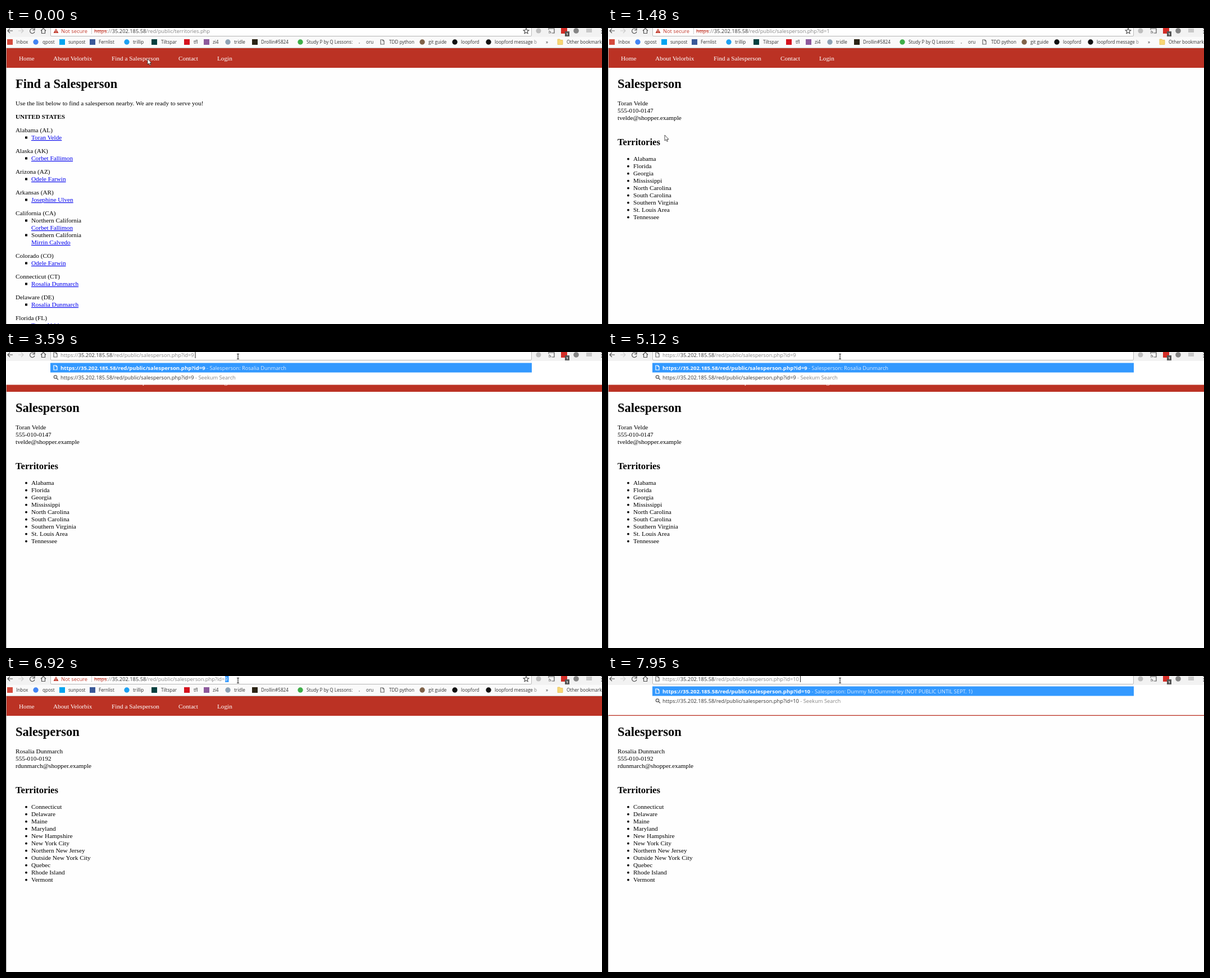
Animation, 1061 px wide and 528 px high, one loop 8 s. Source, as an HTML page:

```html
<!DOCTYPE html>
<html lang="en">
<head>
<meta charset="utf-8">
<title>Find a Salesperson</title>
<style>
  html, body { margin: 0; width: 100%; height: 100%; overflow: hidden; background: #fefefe; }
  svg { display: block; width: 100vw; height: 100vh; }
  text { white-space: pre; font: 11.25px "Liberation Serif", serif; fill: #000; }
  .h1 { font-size: 22.5px; font-weight: bold; }
  .h2 { font-size: 16.6px; font-weight: bold; }
  .bold { font-weight: bold; }
  .link { fill: #00e; text-decoration: underline; }
  .nav { fill: #fff; }
  .ui { font: 9.3px "Open Sans", "Noto Sans", sans-serif; fill: #333; }
  .mark { font: 8.1px "Open Sans", "Noto Sans", sans-serif; fill: #333; }
  .badge { font: bold 6px "Open Sans", sans-serif; fill: #fff; }
  .match { font-size: 9.55px; font-weight: bold; }
  .picked { fill: #fff; }
  .pale { fill: #dcecff; }
  .dim { fill: #858585; }
  .alert { fill: #c0392b; }
  .struck { text-decoration: line-through; }
  .line { fill: none; stroke: #555; stroke-width: 1.2; }
</style>
</head>
<body>
<svg id="stage" viewBox="0 0 1061 528" preserveAspectRatio="none"></svg>
<script>
const LOOP = 8000;
const HOST = "35.202.185.58";
const PATH = "/red/public/";

const text = (x, y, s, cls = "") => `<text x="${x}" y="${y}" class="${cls}">${s}</text>`;
const span = (s, cls) => `<tspan class="${cls}">${s}</tspan>`;
const rect = (x, y, w, h, fill) => `<rect x="${x}" y="${y}" width="${w}" height="${h}" fill="${fill}"/>`;
const circle = (x, y, r, fill) => `<circle cx="${x}" cy="${y}" r="${r}" fill="${fill}"/>`;
const line = (d, stroke = "#555") => `<path class="line" d="${d}" style="stroke:${stroke}"/>`;
const shape = (d, x, y, fill, stroke) =>
  `<path transform="translate(${x} ${y})" d="${d}" fill="${fill}" stroke="${stroke}" stroke-width=".8"/>`;

// Web pages
const torin = "Toran Velde", walden = "Corbet Fallimon", odele = "Odele Farwin",
      josephine = "Josephine Ulven", mirrin = "Mirrin Calvedo", rosalia = "Rosalia Dunmarch";

const regions = [
  ["Alabama (AL)", [torin]],
  ["Alaska (AK)", [walden]],
  ["Arizona (AZ)", [odele]],
  ["Arkansas (AR)", [josephine]],
  ["California (CA)", [walden, "Northern California"], [mirrin, "Southern California"]],
  ["Colorado (CO)", [odele]],
  ["Connecticut (CT)", [rosalia]],
  ["Delaware (DE)", [rosalia]],
  ["Florida (FL)", [torin]],
];

function territoriesPage() {
  let out = text(17, 107, "Find a Salesperson", "h1") +
    text(17, 138, "Use the list below to find a salesperson nearby. We are ready to serve you!") +
    text(17, 162, "UNITED STATES", "bold");
  let y = 186;
  for (const [region, ...entries] of regions) {
    out += text(17, y, region);
    for (const [person, area] of entries) {
      y += 13;
      out += rect(34, y - 5.5, 4, 4, "#000");
      if (area) {
        out += text(45, y, area);
        y += 13;
      }
      out += text(45, y, person, "link");
    }
    y += 24;
  }
  return out;
}

function salespersonPage(details, territories) {
  return text(17, 107, "Salesperson", "h1") +
    details.map((s, i) => text(17, 138 + i * 13, s)).join("") +
    text(17, 209, "Territories", "h2") +
    territories.map((s, i) => circle(36, 233.7 + i * 13, 1.9, "#000") + text(45, 236.7 + i * 13, s)).join("");
}

const pages = {
  list: territoriesPage(),
  first: salespersonPage([torin, "555-010-0147", "tvelde@shopper.example"],
    ["Alabama", "Florida", "Georgia", "Mississippi", "North Carolina", "South Carolina",
     "Southern Virginia", "St. Louis Area", "Tennessee"]),
  ninth: salespersonPage([rosalia, "555-010-0192", "rdunmarch@shopper.example"],
    ["Connecticut", "Delaware", "Maine", "Maryland", "New Hampshire", "New York City",
     "Northern New Jersey", "Outside New York City", "Quebec", "Rhode Island", "Vermont"]),
};

const navBar = rect(0, 36, 1, 492, "#aaa") + rect(1, 36, 1060, 35, "#bb3224") +
  [[23, "Home"], [84, "About Velorbix"], [188, "Find a Salesperson"], [307, "Contact"], [376, "Login"]]
    .map(([x, s]) => text(x, 58, s, "nav")).join("");

// Browser frame
const fileIcon = (x, y, color) => line(`M${x - 3} ${y - 4}h4l2 2v6h-6zM${x + 1} ${y - 4}v2h2`, color);
const searchIcon = y => line(`M90 ${y + 1}l3 3`) +
  `<circle class="line" cx="88" cy="${y - 1}" r="2.7"/>`;

const toolbar = rect(0, 0, 1061, 16, "#f2f2f2") +
  line("M12 5H3M7 1L3 5l4 4") + line("M22 5h9M27 1l4 4-4 4", "#ccc") +
  line("M50.5 3A4.3 4.3 0 1 0 51 6.5M51 0v4h-4") + line("M62 5l4.5-4.5L71 5M63.5 4v5.5h6V4") +
  `<rect x="79.5" y="-3" width="856" height="17.5" rx="1.5" fill="#fff" stroke="#bbb"/>` +
  circle(948, 5, 4.5, "#bdbdbd") +
  line("M966 3V1h10v8h-4M966 5.5a4 4 0 0 1 4 4M966 8a1.5 1.5 0 0 1 1.5 1.5") +
  rect(988, 0, 11, 10, "#d32d27") + rect(995, 6, 8, 9, "#555") + text(997.3, 13, "1", "badge") +
  circle(1015, 5, 4.8, "#858585") + rect(1033, 1, 10, 7, "#c8c8c8") +
  [1, 5, 9].map(y => circle(1060.5, y, 1.1, "#555")).join("");

// Bookmark: icon centre, label start, label, icon colour, square icon
const bookmarks = [
  [7, 18, "Inbox", "#d54b3d", true],
  [53, 65, "qpost", "#4285f4"],
  [100, 111, "sunpost", "#00a4ef", true],
  [154, 165, "Fernlist", "#3b5998", true],
  [215, 226, "trillip", "#1da1f2"],
  [264, 276, "Tiltspar", "#05403f", true],
  [322, 334, "tfl", "#d5121e", true],
  [357, 368, "zi4", "#8d5a9c", true],
  [395, 406, "tridle", "#8fa3b5"],
  [443, 454, "Drollin#5824", "#2b2415", true],
  [524, 535, "Study P by Q Lessons:", "#3fae49"],
  [741, 752, "git guide", "#80634a"],
  [799, 810, "loopford", "#111"],
  [859, 870, "loopford message " + span("b", "dim"), "#111"],
];

const bookmarkItems = bookmarks.map(([x, labelX, label, color, square]) =>
    (square ? rect(x - 5, 20, 10, 10, color) : circle(x, 25, 4.7, color)) + text(labelX, 28, label, "mark")).join("") +
  circle(629, 27, .9, "#999") + text(641, 28, "oru", "mark") +
  fileIcon(670, 25, "#666") + text(682, 28, "TDD python", "mark") +
  text(961, 28, "»", "mark") +
  shape("M0 0h4l1 1.5h4v8H0z", 982, 20, "#f8d775", "#e5bd52") + text(998, 28, "Other bookmarks", "mark");

const bookmarkBar = hover => rect(0, 16, 1061, 19, "#fafafa") + rect(0, 35, 1061, 1, "#ccc") +
  (hover ? rect(384, 16, 28, 18, "#e9edf2") : "") + bookmarkItems;

function addressBar({ file, mode, selected, caret }) {
  if (mode === "typed") {
    const url = span("https://", "dim") + HOST + span(PATH + file, "dim");
    return fileIcon(88, 5, "#666") + text(97, 8.5, url, "ui") +
      (caret ? rect(caret, 0, 1, 11, "#222") : "");
  }
  const all = selected === "all", digit = selected === "digit";
  const tone = cls => all ? "picked" : cls;
  const tail = digit ? span(file.slice(0, -1), "dim") + span(file.slice(-1), "picked") : span(file, tone("dim"));
  const url = span("https", tone("alert") + " struck") + span("://", tone("dim")) +
    span(HOST, tone("")) + span(PATH, tone("dim")) + tail;
  return shape("M4.5 0L9 8H0z", 84.5, 1, "#c0392b", "none") + rect(88.5, 3.5, 1, 3, "#fff") + rect(88.5, 7.2, 1, 1, "#fff") +
    text(98, 8.5, "Not secure", "ui alert") + rect(152, 0, 1, 11, "#ccc") +
    (all ? rect(157, 0, 239, 11, "#3399ff") : "") + (digit ? rect(390, 0, 6.5, 11, "#3399ff") : "") +
    text(157, 8.5, url, "ui") +
    line("M926 .5l1.4 3.2 3.4.3-2.6 2.3.8 3.4-3-1.8-3 1.8.8-3.4-2.6-2.3 3.4-.3z");
}

function dropdown({ file, menu }) {
  const { top, bottom, title, extra } = menu;
  const url = "https://" + HOST + PATH;
  let out = rect(0, 15.5, 1061, bottom - 15.5, "#fff") + rect(79, top, 857, 17, "#3399ff") +
    fileIcon(88, top + 8.5, "#fff") +
    text(97, top + 12, span(url + file, "match picked") + span(" - Salesperson: " + title, "pale"), "ui") +
    searchIcon(top + 26) + text(97, top + 29.5, url + file + span(" - Seekum Search", "dim"), "ui");
  if (extra) {
    out += fileIcon(88, top + 42.5, "#666") +
      text(97, top + 46.5, url + extra.file + span(" - Salesperson: " + extra.title, "dim"), "ui");
  }
  return out;
}

// Pointers, drawn from their hot spot
const pointers = {
  arrow: (x, y) => shape("M0 0V10L2.3 8 4 11.5 5.5 10.8 4 7.5H7Z", x, y, "#fff", "#222"),
  hand: (x, y) => shape("M-1.2 .5h2.2v4.5l5 1.2v4l-1.5 3.6h-5.5l-3-4.8 1-1.2 1.8 1.3z", x, y, "#fff", "#222"),
  beam: (x, y) => line(`M${x - 2} ${y - 4.5}h4M${x} ${y - 4.5}v9M${x - 2} ${y + 4.5}h4`, "#333"),
};

// Each step changes part of the state and holds until the next
const person = id => "salesperson.php?id=" + id;
const hidden = "Dummy McDummerley (NOT PUBLIC UNTIL SEPT. 1)";
const steps = [
  [0, { page: "list", file: "territories.php", mode: "idle", pointer: ["arrow", 252, 55] }],
  [410, { pointer: ["arrow", 208, 112] }],
  [560, { pointer: ["arrow", 158, 169] }],
  [710, { pointer: ["arrow", 128, 182] }],
  [835, { pointer: ["arrow", 106, 190] }],
  [960, { pointer: ["hand", 97, 190] }],
  [1210, { pointer: ["hand", 97.5, 190] }],
  [1350, { page: "first", file: person(1) }],
  [1480, { pointer: ["arrow", 101, 191] }],
  [1630, { pointer: ["arrow", 220, 118] }],
  [1750, { pointer: ["hand", 325, 49] }],
  [1900, { pointer: ["arrow", 374, 31] }],
  [2050, { pointer: ["arrow", 402, 18], hover: true }],
  [2170, { pointer: ["beam", 413, 8] }],
  [2410, { selected: "all" }],
  [2540, { selected: "digit" }],
  [3590, { mode: "typed", file: person(9), selected: null, hover: false, caret: 336.5,
           menu: { top: 19.5, bottom: 58.5, title: rosalia } }],
  [4090, { caret: 0 }],
  [4590, { caret: 336.5 }],
  [5120, { caret: 0 }],
  [5640, { menu: null }],
  [5760, { mode: "idle", page: "ninth" }],
  [6790, { selected: "all" }],
  [6920, { selected: "digit" }],
  [7800, { mode: "typed", file: person(1), selected: null, caret: 336.5,
           menu: { top: 18.5, bottom: 94, title: torin, extra: { file: person(10), title: hidden } } }],
  [7950, { file: person(10), caret: 342, menu: { top: 18.5, bottom: 69.7, title: hidden } }],
];

function render(state) {
  const [kind, x, y] = state.pointer;
  return rect(0, 0, 1061, 528, "#fefefe") + navBar + pages[state.page] + bookmarkBar(state.hover) +
    (state.menu ? dropdown(state) : "") + toolbar + addressBar(state) + pointers[kind](x, y);
}

const stage = document.getElementById("stage");
let shown = 0;

function tick() {
  const time = performance.now() % LOOP;
  const passed = steps.filter(([start]) => start <= time);
  if (passed.length !== shown) {
    shown = passed.length;
    stage.innerHTML = render(Object.assign({}, ...passed.map(([, change]) => change)));
  }
  requestAnimationFrame(tick);
}
tick();
</script>
</body>
</html>
```
